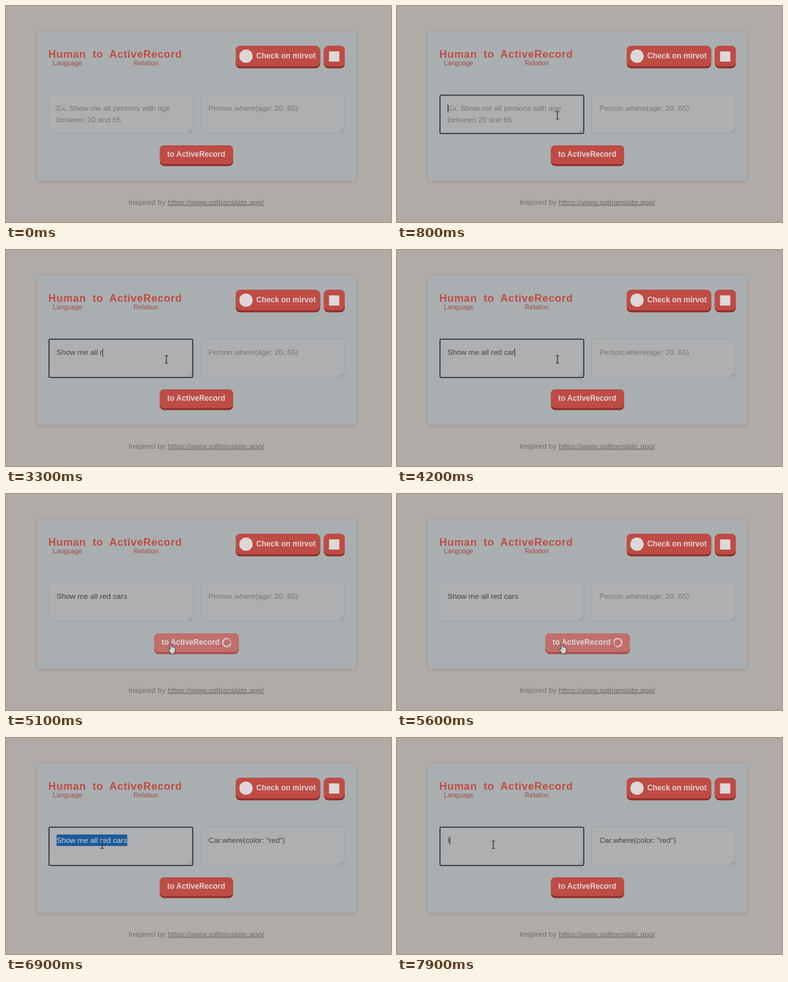
An HTML page that plays this animation: 600 by 338 pixels, repeating every 8 s.

```html
<!DOCTYPE html>
<html lang="en">
<head>
<meta charset="utf-8">
<title>Human to ActiveRecord</title>
<style>
  html, body { margin: 0; width: 100%; height: 100%; overflow: hidden; background: #b0aba7; }
  svg { display: block; }
  text { font: 11.8px "Liberation Sans", Arial, sans-serif; white-space: pre; fill: #3e4248; }
  .title { font-weight: 700; font-size: 16.4px; letter-spacing: .65px; fill: #c24a44; }
  .sub { font-size: 10.35px; fill: #a14a46; }
  .label { font-weight: 700; font-size: 11.85px; fill: #dcd8d7; }
  .hint { fill: #72767b; }
  .foot { fill: #6d6c70; }
  .field { fill: #aeafb0; stroke: #9ca5ad; stroke-width: 1; }
  .focus { stroke: #23272f; stroke-width: 1.5; }
  .face { fill: #bf4b45; }
  .edge { fill: #922b28; }
  .grip { stroke: #74777a; stroke-width: .8; }
  .mark { fill: #dcd8d7; }
  .busy .face { fill: #c06f6c; }
  .busy .edge { fill: #a94b48; }
</style>
</head>
<body>
<svg id="stage" width="600" height="338" viewBox="0 0 600 338">
  <rect width="600" height="338" fill="#b0aba7"/>
  <rect x="48" y="39.5" width="498" height="234" rx="6" fill="#a9afb0"
        style="filter:drop-shadow(0 1.5px 2px rgba(70,60,55,.22))"/>

  <text class="title" x="66" y="81">Human</text>
  <text class="title" x="135" y="81">to</text>
  <text class="title" x="161" y="81">ActiveRecord</text>
  <text class="sub" x="73" y="93">Language</text>
  <text class="sub" x="199" y="93">Relation</text>

  <rect class="edge" x="358" y="62.5" width="131.5" height="35" rx="7"/>
  <rect class="face" x="358" y="62.5" width="131.5" height="32" rx="7"/>
  <circle class="mark" cx="374" cy="78.5" r="10.5"/>
  <text class="label" x="390" y="82.3">Check on mirvot</text>
  <rect class="edge" x="495.5" y="62.5" width="32.5" height="35" rx="7"/>
  <rect class="face" x="495.5" y="62.5" width="32.5" height="32" rx="7"/>
  <rect class="mark" x="503.5" y="71" width="16" height="16"/>

  <rect id="input" x="67" y="139.5" width="224" height="60" rx="2"/>
  <rect class="field" x="303.5" y="139.5" width="224" height="60" rx="2"/>
  <path class="grip" d="M283.500 198l6-6M287 198l2.500-2.500M520 198l6-6M523.500 198l2.500-2.500"/>

  <g id="inputHint">
    <text class="hint" x="78.800" y="164.300">Ex. Show me all persons with age</text>
    <text class="hint" x="78.800" y="182.300">between 20 and 65</text>
  </g>
  <rect id="selection" x="78.800" y="151" height="18" fill="#1d5a9b"/>
  <text id="query" x="78.800" y="164.300"></text>
  <rect id="caret" y="154" width="1" height="13" fill="#2c3036"/>
  <text id="result" x="315.500" y="164.300"></text>

  <g id="button">
    <rect class="edge" y="218" height="32.500" rx="7"/>
    <rect class="face" y="218" height="29.500" rx="7"/>
    <text class="label" y="236.300">to ActiveRecord</text>
    <g id="spinner" fill="none" stroke="#ddc9c8" stroke-width="2.200">
      <circle r="6.300" opacity=".45"/>
      <path d="M0-6.300A6.300 6.300 0 1 1-6.300 0"/>
    </g>
  </g>

  <text class="foot" x="191" y="310.500">Inspired by <tspan text-decoration="underline">https://www.sqltranslate.app/</tspan></text>

  <g id="pointer">
    <path id="arrow" d="M0 0V12L2.800 9.500L4.700 14L6.800 13.100L4.900 8.800H8.500Z" fill="#b9b9b9" stroke="#34373b" stroke-width=".9"/>
    <path id="beam" d="M-2.500-6Q-.5-6 0-5Q.5-6 2.500-6M0-5V5M-2.500 6Q-.5 6 0 5Q.5 6 2.500 6" fill="none" stroke="#24272b" stroke-width="1.100"/>
    <path id="hand" d="M-1.200 1Q0-.8 1.200 1V6.200Q2.300 5.300 3.200 6.600Q4.400 5.900 5.200 7.200Q7 6.800 7 8.600V12Q6.500 14 5.600 15V17H-.8V15Q-2.500 13-4.200 9.800Q-3.600 8-1.200 10Z" fill="#d2d2d2" stroke="#303236" stroke-width=".9"/>
  </g>
</svg>
<script>
const LOOP = 8000, STEP = 100, TEXT_X = 78.8;
const QUERY = "Show me all red cars";
const KEY_TIMES = [1300, 1500, 1600, 1900, 2000, 2100, 2300, 2500, 2700, 2800,
                   3000, 3100, 3300, 3500, 3600, 3700, 3800, 4000, 4200, 4300];
const RETYPE = 7800, SUBMIT = 4800, ANSWER = 5900, SELECT = 6700;

// Pointer stops: time, x, y
const STOPS = [[100, 512, 292], [600, 250, 171], [4300, 250, 171], [4700, 257, 233],
               [6000, 257, 233], [6300, 153, 201], [6500, 150, 167]];

const $ = id => document.getElementById(id);
const set = (node, attrs) => {
  for (const name in attrs) node.setAttribute(name, attrs[name]);
};
const show = (id, on) => set($(id), { visibility: on ? "visible" : "hidden" });

const pen = document.createElement("canvas").getContext("2d");
pen.font = '11.8px "Liberation Sans", Arial, sans-serif';
const textWidth = text => pen.measureText(text).width;

function pointerAt(t) {
  const next = STOPS.findIndex(stop => stop[0] > t);
  if (next < 0) return STOPS[STOPS.length - 1].slice(1);
  if (next === 0) return STOPS[0].slice(1);
  const [t0, x0, y0] = STOPS[next - 1], [t1, x1, y1] = STOPS[next];
  const p = (t - t0) / (t1 - t0), e = p * p * (3 - 2 * p);
  return [x0 + (x1 - x0) * e, y0 + (y1 - y0) * e];
}

function drawPointer(t) {
  const [x, y] = pointerAt(t);
  const inside = (left, top, right, bottom) => x > left && x < right && y > top && y < bottom;
  const kind = inside(67, 139, 291, 200) || inside(303, 139, 528, 200) ? "beam"
    : inside(240, 218, 354, 250) ? "hand" : "arrow";
  set($("pointer"), { transform: `translate(${x} ${y})` });
  for (const id of ["arrow", "beam", "hand"]) show(id, t >= 100 && id === kind);
}

function drawInput(t) {
  const typed = t >= RETYPE ? "I" : QUERY.slice(0, KEY_TIMES.filter(k => k <= t).length);
  const focused = t >= 700 && t < SUBMIT || t >= SELECT;
  const selected = t >= SELECT && t < RETYPE;
  const width = textWidth(typed);
  $("query").textContent = typed;
  $("query").style.fill = selected ? "#d5d7d9" : "";
  set($("input"), { class: focused ? "field focus" : "field" });
  set($("selection"), { width });
  set($("caret"), { x: TEXT_X + width });
  show("inputHint", !typed);
  show("selection", selected);
  show("caret", focused && !selected);
}

function drawButton(t) {
  const busy = t >= SUBMIT && t < ANSWER;
  const x = busy ? 231 : 239.8, width = busy ? 132 : 114.2;
  set($("button"), { class: busy ? "busy" : "" });
  for (const rect of $("button").querySelectorAll("rect")) set(rect, { x, width });
  set($("button").querySelector("text"), { x: x + 11.5 });
  set($("spinner"), { transform: `translate(344 232.5) rotate(${(t - SUBMIT) * .36})` });
  show("spinner", busy);
}

function draw(t) {
  drawInput(t);
  drawButton(t);
  drawPointer(t);
  const answered = t >= ANSWER;
  $("result").textContent = answered ? 'Car.where(color: "red")' : "Person.where(age: 20..65)";
  set($("result"), { class: answered ? "" : "hint" });
}

const start = performance.now();
function tick() {
  const t = (performance.now() - start) % LOOP;
  draw(Math.floor(t / STEP) * STEP);
  requestAnimationFrame(tick);
}
tick();
</script>
</body>
</html>
```
